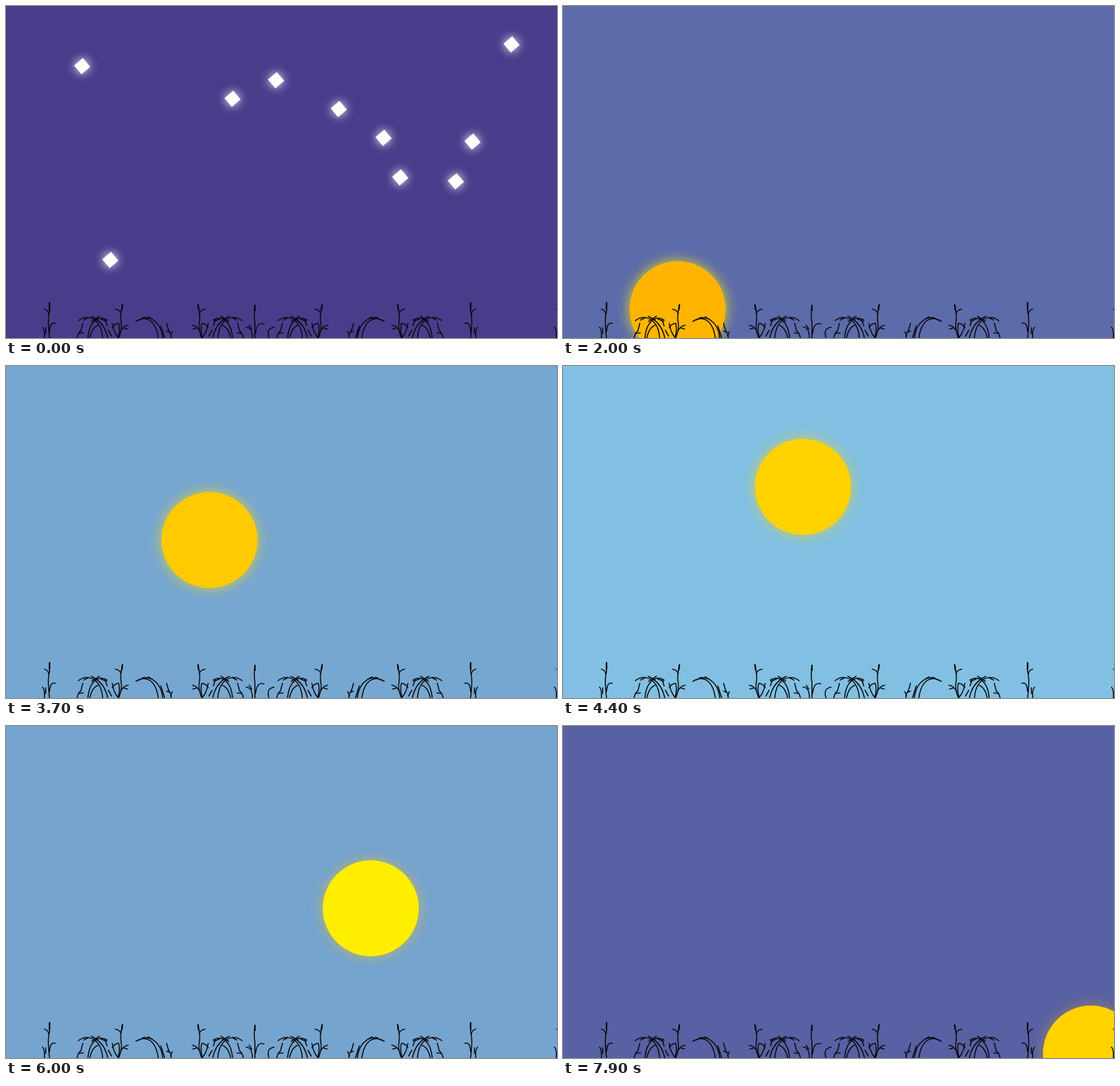
Recreate the animation shown at these times as an HTML page. Size 861 by 519 pixels, loop 8000 ms.

```html
<!DOCTYPE html>
<html lang="en">
<head>
<meta charset="utf-8">
<title>Night and day</title>
<style>
  html, body { margin: 0; width: 100%; height: 100%; overflow: hidden; }
  body { position: relative; background: #483d8b; }
  svg { position: absolute; left: 0; top: 0; }
  .sun, .star { position: absolute; left: 0; top: 0; }
  .sun { width: 150px; height: 150px; margin: -75px; border-radius: 50%; }
  .star { width: 18px; height: 18px; margin: -9px; background: #fff; box-shadow: 0 0 15px #fff; }
</style>
</head>
<body>
<div id="stars"></div>
<div class="sun" id="sun"></div>
<svg width="861" height="519" fill="none" stroke="#08080c" stroke-width="1.6" stroke-linecap="round">
  <defs>
    <g id="reed">
      <path d="M68 464V474" stroke-width="2.4"/>
      <path d="M68 464Q69 475 67 483T68 519M60 474Q66 475 67 482M57 502Q61 506 60 519M62 512V503M68 509Q69 493 77 496"/>
    </g>
    <g id="clump">
      <path d="M111 519Q113 510 117 508L120 496M113 512L121 511"/>
      <path d="M113 492C126 481 149 487 151 519M121 491L129 487M158 491C146 483 130 492 128 519M157 493L148 489"/>
      <path d="M133 485Q154 494 159 519M146 485L134 493M131 519Q134 503 144 499M155 491L158 500M160 507L165 516"/>
      <path d="M182 467L181 475" stroke-width="2.2"/>
      <path d="M182 467Q178 485 180 495T176 519M171 474Q178 475 180 481M166 503Q170 496 176 496Q179 506 175 518M166 496Q168 510 175 518M179 509Q183 500 191 499M183 503L190 505"/>
    </g>
    <g id="arch">
      <path d="M203 493C218 483 234 490 238 519M208 491L215 487M215 487C232 486 243 500 245 519M222 486L229 490M242 500L248 519"/>
      <path d="M251 496Q254 509 258 513V519M260 509L257 515M251 508L255 510"/>
    </g>
    <g id="half">
      <use href="#reed"/><use href="#clump"/><use href="#arch"/>
      <use href="#clump" transform="matrix(-1 0 0 1 482 0)"/>
    </g>
  </defs>
  <use href="#half"/>
  <use href="#half" transform="matrix(-1 0 0 1 794 0)"/>
  <use href="#reed" x="800"/>
  <path d="M389 468V476" stroke-width="2.2"/>
  <path d="M389 468Q387 482 389 495V519M375 502Q385 502 385 519M380 499L384 505M390 512Q392 493 403 497M419 502Q406 504 411 519"/>
</svg>
<script>
const LOOP = 8000, DAWN = 700, NOON = 4800, HALF_DAY = 4120;
const sun = document.getElementById('sun');
const stars = document.getElementById('stars');
const positions = [[119, 94], [354, 145], [422, 116], [520, 161], [590, 206],
  [616, 268], [703, 274], [729, 212], [790, 60], [163, 397]];

for (const [x, y] of positions) {
  const star = document.createElement('div');
  star.className = 'star';
  star.style.transform = `translate(${x}px, ${y}px) rotate(50deg)`;
  stars.append(star);
}

const mix = (a, b, f) => a + (b - a) * f;
const rgb = (...c) => `rgb(${c.map(Math.round)})`;

// Green channel of the sun: orange, gold at half, yellow at three quarters, orange
const sunGreen = p => p < .5 ? mix(165, 215, p * 2)
  : p < .75 ? mix(215, 255, p * 4 - 2)
  : mix(255, 165, p * 4 - 3);

function draw(now) {
  const t = Math.floor(now % LOOP / 100) * 100;
  const day = t >= DAWN, dt = t - NOON;
  const light = day ? 1 - Math.abs(dt) / HALF_DAY : 0;
  const p = .5 + dt / HALF_DAY / 2;
  document.body.style.background = rgb(mix(72, 135, light), mix(61, 206, light), mix(139, 235, light));
  stars.style.display = day ? 'none' : '';
  sun.style.display = day ? '' : 'none';
  const x = 408.2 + dt * (dt < 0 ? .0819 : .1345);
  const y = 141 + Math.abs(dt) * (dt < 0 ? .1191 : .1198);
  sun.style.transform = `translate(${Math.round(x)}px, ${Math.round(y)}px)`;
  sun.style.background = rgb(255, sunGreen(p), 0);
  const glow = Math.round(mix(255, 165, p));
  sun.style.boxShadow = `0 0 20px rgba(255, ${glow}, 0, ${mix(.9, .35, p)})`;
}

const start = performance.now();
function tick() {
  draw(performance.now() - start);
  requestAnimationFrame(tick);
}
tick();
</script>
</body>
</html>
```
